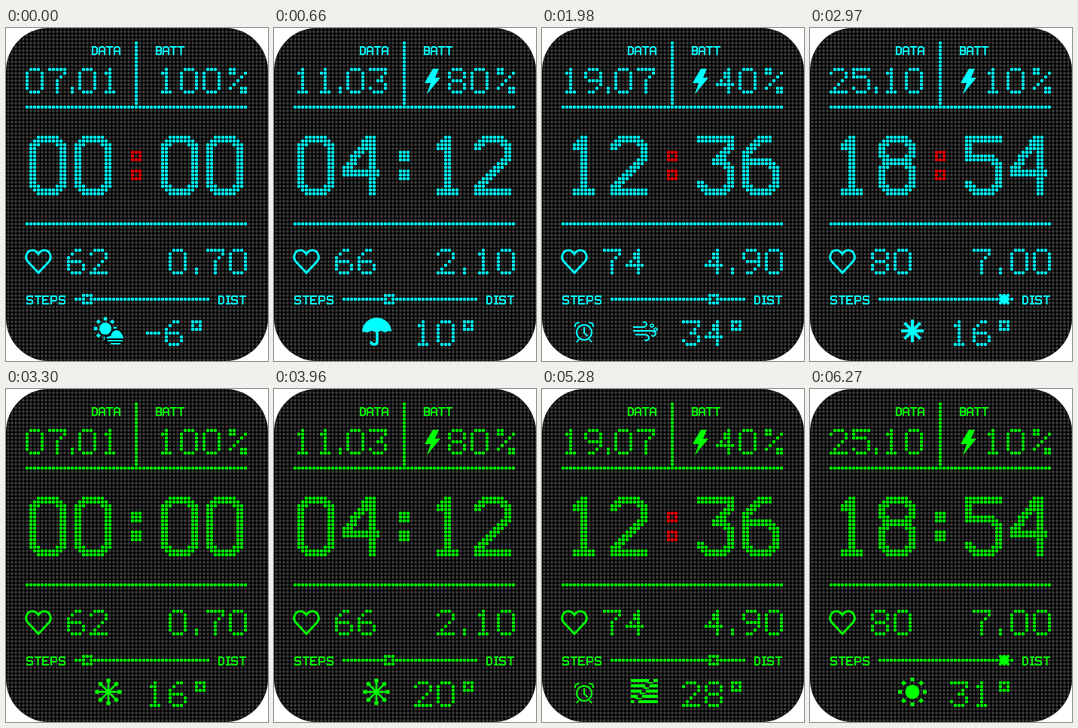
Write an HTML page with a canvas that moves like this. It is 348 by 442 pixels and loops after 6600 ms.

```html
<!DOCTYPE html>
<html lang="en">
<head>
<meta charset="utf-8">
<title>Dot matrix watch face</title>
<style>
html, body { margin: 0; width: 100%; height: 100%; overflow: hidden; background: #fff; }
canvas { display: block; width: 348px; height: 442px; border-radius: 57px; background: #000; }
</style>
</head>
<body>
<canvas id="face" width="348" height="442" aria-label="Watch face: DATA, BATT, STEPS, DIST"></canvas>
<script>
const STEP = 330, STEPS = 20, PITCH = 5;
const ctx = document.getElementById('face').getContext('2d');
let ink;

// Digit strokes on a 10 x 16 dot cell, drawn with a 2 x 2 brush.
const digits = [
  '2,0 6,0 8,2 8,12 6,14 2,14 0,12 0,2 2,0',
  '2,2 4,0 4,14|2,14 6,14',
  '0,2 2,0 6,0 8,2 8,5 0,13 0,14 8,14',
  '0,0 8,0 8,2 4,6 6,6 8,8 8,12 6,14 2,14 0,12',
  '7,14 7,0 6,0 0,8 0,9 8,9',
  '8,0 0,0 0,5 6,5 8,7 8,12 6,14 2,14 0,12',
  '6,0 4,0 0,4 0,12 2,14 6,14 8,12 8,8 6,6 0,6',
  '0,0 8,0 8,2 4,6 4,14',
  '2,0 6,0 8,2 8,4 6,6 2,6 0,4 0,2 2,0|2,6 0,8 0,12 2,14 6,14 8,12 8,8 6,6',
  '8,6 2,6 0,4 0,2 2,0 6,0 8,2 8,10 4,14 2,14'
];
const percent = '0,0 2,0 2,2 0,2 0,0|8,2 0,12|6,12 8,12 8,14 6,14 6,12';

const letters = {
  D: ['M0 0H5L7 2V8L5 10H0M1 0V10', 10],
  A: ['M0 11V2L2 0H5L7 2V11M0 6H7', 10],
  T: ['M-1 0H8M3.5 0V11', 10],
  B: ['M1 0V10M0 0H6L7 1V4L6 5H1M6 5L7 6V9L6 10H0', 10],
  S: ['M7 2V0H1L0 1V4L1 5H6L7 6V9L6 10H0V8', 11],
  E: ['M8 0H0V10H8M0 5H6', 11],
  P: ['M0 11V0H6L7 1V5L6 6H0', 11],
  I: ['M0 0H6M3 0V10M0 10H6', 8]
};

function dot(x, y, r = 2.25) {
  ctx.beginPath();
  ctx.arc(x, y, r, 0, 2 * Math.PI);
  ctx.fill();
}

function glyph(strokes, x, y, big) {
  const cells = new Set();
  const brush = big ? 2 : 1;
  const snap = ([px, py]) => big ? [px, py] : [px >> 1, Math.round(py * 6 / 14 + .1)];
  for (const stroke of strokes.split('|')) {
    const points = stroke.split(' ').map(p => snap(p.split(',').map(Number)));
    points.slice(1).forEach(([x1, y1], i) => {
      const [x0, y0] = points[i];
      const n = Math.max(Math.abs(x1 - x0), Math.abs(y1 - y0), 1);
      for (let k = 0; k <= n; k++) {
        const cx = Math.round(x0 + (x1 - x0) * k / n);
        const cy = Math.round(y0 + (y1 - y0) * k / n);
        for (let b = 0; b < brush * brush; b++) {
          cells.add((cy + (b / brush | 0)) * 16 + cx + b % brush);
        }
      }
    });
  }
  for (const c of cells) dot(x + c % 16 * PITCH, y + (c >> 4) * PITCH);
}

function number(text, xs, y, big) {
  [...text].forEach((c, i) => glyph(digits[c], xs[i], y, big));
}

function row(x0, x1, y) {
  for (let x = x0; x <= x1; x += PITCH) dot(x, y);
}

function block(x, y, full) {
  for (let i = 0; i < 9; i++) {
    if (full || i !== 4) dot(x + (i % 3 - 1) * PITCH, y + ((i / 3 | 0) - 1) * PITCH);
  }
}

function stroke(d, width = 2) {
  ctx.lineWidth = width;
  ctx.stroke(new Path2D(d));
}

const fill = d => ctx.fill(new Path2D(d));

function label(text, x, y) {
  for (const c of text) {
    const [d, advance] = letters[c];
    ctx.save();
    ctx.translate(x, y);
    stroke(d);
    ctx.restore();
    x += advance;
  }
}

function spokes(count, draw) {
  for (let i = 0; i < count; i++) {
    ctx.save();
    ctx.rotate(i * 2 * Math.PI / count);
    draw();
    ctx.restore();
  }
}

function sun(r, reach, size) {
  dot(0, 0, r);
  spokes(8, () => ctx.fillRect(reach - size / 2, -size / 2, size, size));
}

// Weather icons, centred on the origin.
const icons = {
  cloudy() {
    ctx.save();
    ctx.translate(-4, -3);
    sun(8, 13, 4.5);
    ctx.restore();
    ctx.save();
    ctx.fillStyle = '#000';
    fill('M-5 17V9Q-3 5 1 5Q4 -5 12 -3Q22 0 21 17Z');
    ctx.restore();
    fill('M-3 10Q-2 7 3 7Q5 -1 11 -1Q18 0 20 10Z');
    stroke('M-1 13H19M3 17H16');
  },
  umbrella() {
    fill('M-19 1A19 18 0 0 1 20 1L16 0L12 2L6 0L0 2L-6 0L-12 2Z');
    stroke('M1 0V14Q1 18 -3 18Q-7 18 -7 14', 3.5);
  },
  wind() {
    stroke('M-15 -5H-3Q3 -5 3 -9Q2 -13 -2 -11M-15 0H9Q15 0 15 4Q14 8 9 6M-12 5H0Q6 5 6 10Q4 14 0 12');
    stroke('M10 -9a2 2 0 1 0 .1 0M15 -4a2 2 0 1 0 .1 0', 1.7);
  },
  star() {
    spokes(8, () => stroke('M0 0H15', 4));
  },
  snow() {
    spokes(8, () => { stroke('M0 0H14', 2.5); dot(15, 0, 2.8); });
  },
  fog() {
    for (let i = 0; i < 5; i++) {
      const y = -15 + i * 7, cut = 9 - i * 5;
      stroke(`M-18 ${y}H${cut - 3}M${cut + 3} ${y}H18`, 4);
      if (i < 4) stroke(`M${cut - 5} ${y + 3}h7`, 2);
    }
  },
  sun() { sun(9.5, 16.5, 5); }
};
const forecast = ('cloudy sun umbrella cloudy sun cloudy wind fog umbrella star ' +
  'snow star snow cloudy umbrella wind fog cloudy umbrella sun').split(' ');

function temperature(step) {
  if (step <= 2) return -6 + 8 * step;
  if (step <= 6) return 10 + 6 * (step - 2);
  if (step <= 9) return 34 - 6 * (step - 6);
  return step <= 16 ? 2 * step - 4 : step + 12;
}

function weather(step) {
  ctx.save();
  ctx.translate(136, 402);
  icons[forecast[step]]();
  ctx.restore();
  const t = temperature(step);
  if (t < 0) row(188, 203, 405);
  const single = Math.abs(t) < 10;
  number(String(Math.abs(t)), single ? [213] : [188, 218], 390);
  block(single ? 253 : 258, 395);
}

function alarm() {
  stroke('M66 404a10 10 0 1 0 -20 0a10 10 0 1 0 20 0M56 397V405L61 409M49 413L46 417M63 413L66 417');
  stroke('M44 397Q43 391 50 391M68 397Q69 391 62 391');
}

function grid() {
  ctx.fillStyle = '#3a3a3a';
  for (let y = 0; y <= 442; y += PITCH) {
    for (let x = -2; x <= 350; x += PITCH) dot(x, y, 1.9);
  }
}

function draw(step) {
  const k = step % 10;
  const pad = n => String(n).padStart(2, '0');
  ink = step < 10 ? '#0ff' : '#0f0';
  ctx.clearRect(0, 0, 348, 442);
  grid();
  ctx.fillStyle = ctx.strokeStyle = ink;

  label('DATA', 114, 25);
  label('BATT', 199, 25);
  label('STEPS', 28, 356);
  label('DIST', 282, 356);
  row(28, 318, 105);
  row(28, 318, 260);
  for (let y = 20; y <= 100; y += PITCH) dot(173, y);

  number(pad(7 + 2 * k) + pad(k + 1), [28, 58, 98, 128], 55);
  dot(88, 80);
  dot(88, 85);
  number(String(100 - 10 * k), k ? [233, 263] : [203, 233, 263], 55);
  glyph(percent, 298, 55);
  if (k) fill('M211 54H219L214 66H221L203 88L208 73H200Z');

  const minutes = 126 * k;
  number(pad(minutes / 60 | 0) + pad(minutes % 60), [33, 93, 208, 268], 145, true);
  const alert = (step + 2) % 8 < 4;
  ctx.fillStyle = alert ? '#f00' : ink;
  block(173, 170, !alert);
  block(173, 195, !alert);
  ctx.fillStyle = ink;

  stroke('M43 325L29 310C24 304 28 295 35 295Q40 295 43 300Q46 295 51 295C58 295 62 304 57 310Z', 3);
  number(String(62 + 2 * k), [83, 113], 295);
  number(pad(7 * (k + 1)) + '0', [218, 268, 298], 295);
  dot(253, 320);
  dot(253, 325);

  const notch = Math.min(10, Math.round(1.3 * k));
  const knob = 108 + 15 * notch;
  row(93, knob - 10, 360);
  row(knob + 10, 268, 360);
  block(knob, 360, notch === 10);
  if (notch === 10) ctx.fillRect(knob - 5, 355, 10, 10);

  if (k >= 3 && k <= 6) alarm();
  weather(step);
}

let shown = -1;
function tick() {
  const step = Math.floor(performance.now() / STEP) % STEPS;
  if (step !== shown) draw(shown = step);
  requestAnimationFrame(tick);
}
tick();
</script>
</body>
</html>
```
